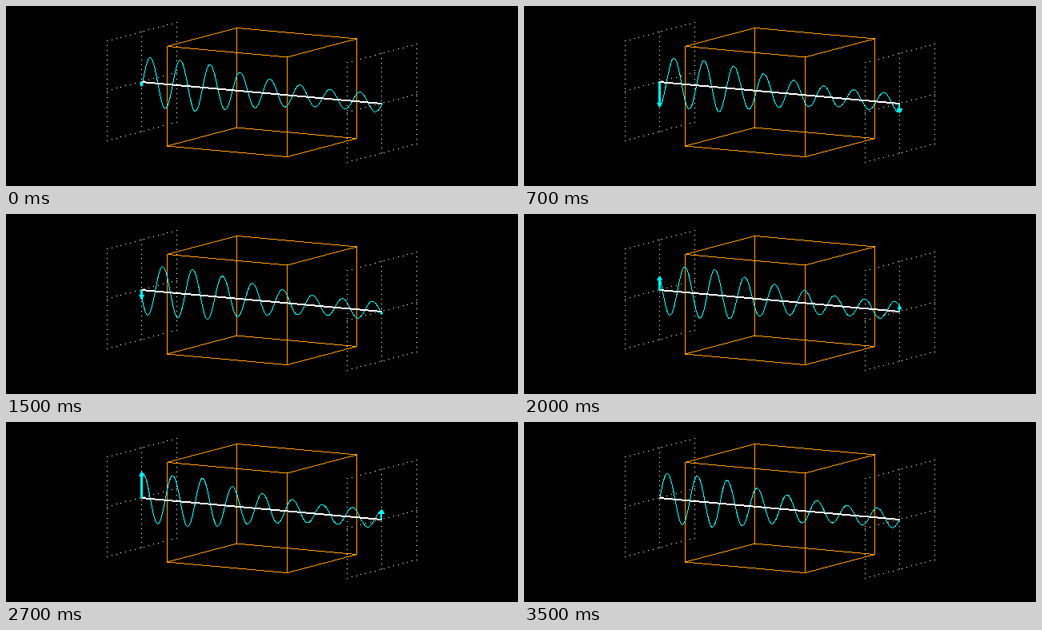
A matplotlib script for the animation above (3600 ms loop, 640 by 225 pixels).

```python
import numpy as np
import matplotlib.pyplot as plt
from matplotlib.animation import FuncAnimation
from matplotlib.collections import PolyCollection

W, H, DPI = 640, 225, 100
FRAMES, INTERVAL = 36, 100

CYAN, ORANGE, WHITE = "#00ffff", "#ff9900", "#ffffff"

START = np.array([169.9, 94.5])
AXIS = np.array([300.0, 27.0])
SIDE = np.array([43.5, -11.5])
UP = np.array([0.0, -62.3])
AMP, WAVES = 31.0, 8
UNIT = np.array([(0, 0), (1, 0), (1, 1), (0, 1)])

fig = plt.figure(figsize=(W / DPI, H / DPI), dpi=DPI, facecolor="black")
ax = fig.add_axes([0, 0, 1, 1])
ax.set_xlim(0, W)
ax.set_ylim(H, 0)
ax.axis("off")


def point(s, side=0, up=0):
    """Project a place along the beam, across it and above it."""
    return START + s * AXIS + side * SIDE + up * UP


def squares(points):
    """Unit squares of the pixels that hold the points."""
    pixels = np.unique(np.floor(points).astype(int), axis=0)
    return pixels[:, None, :] + UNIT


def trace(points):
    """Sample a polyline at one point per pixel step."""
    parts = []
    for a, b in zip(points[:-1], points[1:]):
        steps = int(np.ceil(np.abs(b - a).max()))
        parts.append(np.linspace(a, b, steps + 1))
    return np.concatenate(parts)


def plot(points, color, z):
    art = PolyCollection(squares(points), facecolors=color, edgecolors="none",
                         linewidths=0, zorder=z, snap=False)
    return ax.add_collection(art, autolim=False)


def dots(a, b, gap=6):
    n = round(np.hypot(*(b - a)) / gap)
    plot(np.linspace(a, b, n + 1), WHITE, 1)


def dotted_plane(s):
    for k in (-1, 0, 1):
        dots(point(s, k, 1), point(s, k, -1))
        dots(point(s, -1, k), point(s, 1, k))


def box(s0, s1):
    corners = [(-1, -1), (1, -1), (1, 1), (-1, 1)]
    for s in (s0, s1):
        ring = [point(s, *c) for c in corners]
        plot(trace(ring + ring[:1]), ORANGE, 2)
    for c in corners:
        plot(trace([point(s0, *c), point(s1, *c)]), ORANGE, 2)


def displacement(s, phase):
    decay = np.exp(-np.clip((s - 0.25) / 0.5, 0, 1))
    return AMP * decay * np.sin(2 * np.pi * WAVES * s - phase)


class Arrow:
    def __init__(self, s, width):
        self.s, self.width = s, width
        self.x, self.y = np.floor(point(s)) + 0.5
        self.shaft, self.head = (
            ax.fill([0], [0], color=CYAN, lw=0, zorder=5, antialiased=False)[0]
            for _ in range(2))

    def update(self, phase):
        d = -displacement(self.s, phase)
        size = min(abs(d) / 2, 4)
        base = self.y + d - np.sign(d) * size
        tip = self.y + d + np.sign(d) * size / 4
        half = 0.75 * size
        left = self.x - 0.5 - self.width // 2
        right = left + self.width
        self.shaft.set_xy([(left, self.y), (right, self.y),
                           (right, base), (left, base)])
        self.head.set_xy([(self.x - half, base), (self.x, tip),
                          (self.x + half, base)])
        for part in (self.shaft, self.head):
            part.set_visible(size > 0.5)


dotted_plane(0)
dotted_plane(1)
box(0.25, 0.75)
beam = trace([point(0), point(1)])
for row in (0, 1):
    plot(beam + (0, row), WHITE, 4)

S = np.linspace(0, 1, 301)
PATH = START + S[:, None] * AXIS
wave = plot(PATH, CYAN, 3)
arrows = [Arrow(0, 3), Arrow(1, 2)]


def update(i):
    phase = 2 * np.pi * (i + 1) / FRAMES
    lift = np.outer(displacement(S, phase), (0, -1))
    wave.set_verts(squares(trace(PATH + lift)))
    for arrow in arrows:
        arrow.update(phase)
    return [wave] + [p for a in arrows for p in (a.shaft, a.head)]


anim = FuncAnimation(fig, update, frames=FRAMES, interval=INTERVAL,
                     repeat=True, repeat_delay=0)
plt.show()
```
